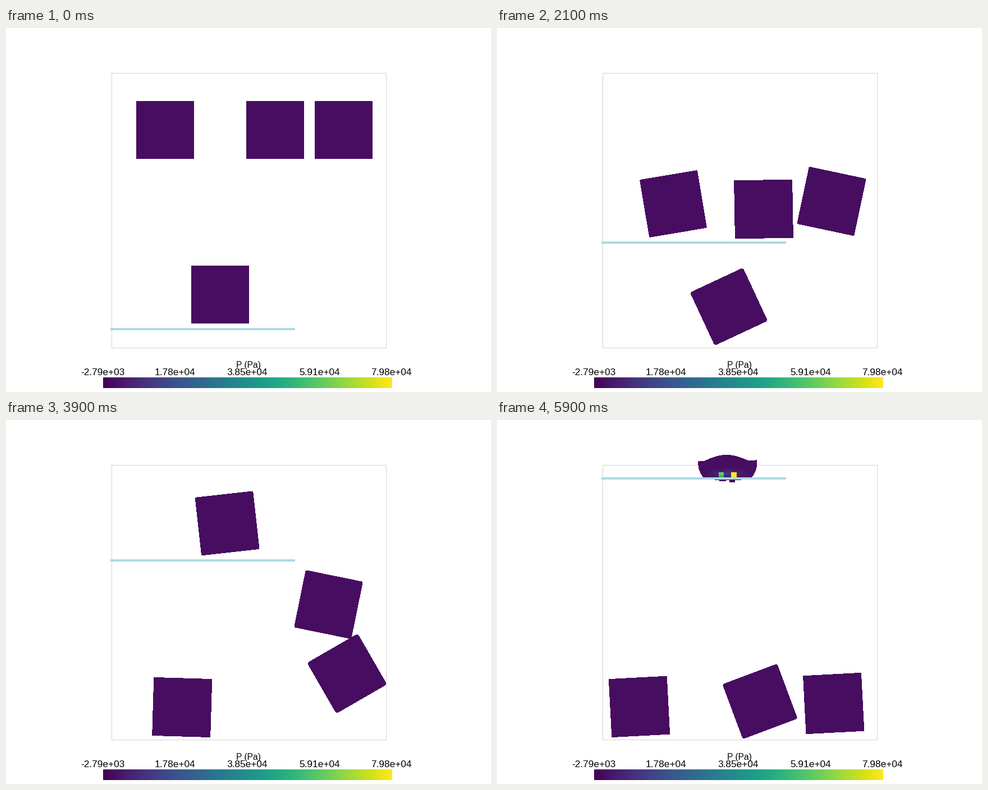
Recreate the animation shown at these times as a matplotlib script. Size 864 by 648 pixels, loop 6 s.

```python
import numpy as np
import matplotlib.pyplot as plt
from matplotlib.animation import FuncAnimation
from matplotlib.patches import Polygon, Rectangle

W, H, DPI = 864, 648, 100
FRAMES, INTERVAL = 60, 100
PX = 72 / DPI
SIDE = 103
GRAVITY = 0.8
FLOOR = 564.5
HIT = 6.3            # first contact of the falling blocks
CRUSH = 48           # the upper block reaches the ceiling
LAST = FRAMES - 1
VIRIDIS = plt.get_cmap("viridis")
DARK = VIRIDIS(0.034)


def plate_y(t):
    return 536.3 - 7.33 * t


def fall(t):
    return 181 + 20.2 * t + GRAVITY / 2 * t ** 2


def along(t, keys):
    """Straight motion between key rows of (time, value, ...)."""
    times, *channels = zip(*keys)
    return [np.interp(t, times, c) for c in channels]


def tumble(t, keys):
    """Free flight between contacts given as (time, x, y, degrees)."""
    x, y, angle = along(t, keys)
    for (t0, *_), (t1, *_) in zip(keys, keys[1:]):
        if t0 <= t < t1:
            y -= GRAVITY / 2 * (t - t0) * (t1 - t)
    return x, y, angle


def left(t):
    """Spins off the wall, then slides and rocks on the rising plate."""
    rock = 7 * np.cos(2 * np.pi * (t - 21) / 18) * np.exp((21 - t) / 30)
    angle = max(-14.8 * max(t - HIT, 0), -92.5 - rock)
    y = min(fall(t), fall(HIT) + 9.3 * (t - HIT),
            plate_y(t) - 63.1 - 0.9 * rock)
    if t < 10:
        x = 283.5 - 9.3 * np.clip(t - HIT, 0, 3)
    else:
        x = 411 - 156 * max((45 - t) / 35, 0) ** 1.26
    return x, y, angle


def middle(t):
    """Bounces off the lower block and drops past the end of the plate."""
    if t < HIT:
        return 479.5, fall(t), 0
    return tumble(t, [(HIT, 479.5, fall(HIT), 0), (9, 500, 348, 34.7),
                      (14, 540, 284, 75), (21, 596, 308.5, 102),
                      (29, 619, 345, 87.5), (39, 607.5, 451.5, 60),
                      (48, 576, 491.5, 42), (59, 599.7, 504.5, -3)])


def right(t):
    """Drops to the floor, rolls to the left wall and comes back."""
    x, angle = along(t, [(HIT, 601.5, 0), (9, 608.5, 8.5), (13.5, 605, 0),
                         (21, 413, -25), (27, 260, -92), (48, 354, -85.5),
                         (59, 253.5, -93)])
    a = np.radians(angle)
    reach = SIDE / 2 * (abs(np.cos(a)) + abs(np.sin(a)))
    return x, min(fall(t), FLOOR - reach), angle


def lower(t):
    """Rides the plate, then tips over its end."""
    if t < 21:
        x = 381.5 + 7.8 * max(t - 9, 0)
        return x, plate_y(t) - 62 + 0.1 * t, 0
    return tumble(t, [(21, 475, 322.5, -1), (29, 526.5, 257.5, 48),
                      (39, 574.5, 328.5, 101.5), (48, 466, 419, 135),
                      (59, 468.5, 501, 159.5)])


def block(x, y, angle):
    """Square whose corners are blunted the more it is tilted."""
    a = np.radians(angle)
    h = SIDE / 2
    k = h - 3 * abs(np.sin(2 * a))
    pts = np.array([(-k, -h), (k, -h), (h, -k), (h, k),
                    (k, h), (-k, h), (-h, k), (-h, -k)])
    c, s = np.cos(a), np.sin(a)
    return pts @ np.array([(c, s), (-s, c)]) + (x, y)


def crushed(t):
    """Block squeezed against the ceiling by the rising plate."""
    c = (t - CRUSH) / (LAST - CRUSH)
    half = 52
    corner, bottom = 81 - 8 * c, plate_y(t) - 4.5 + 2 * c
    u = np.linspace(-half, half, 40)
    dome = 10.5 * c * np.clip(np.cos(np.pi * (u + 3) / 78), 0, 1) + 0.02 * c * u
    v = np.linspace(0, 1, 12)
    edge = half - 9 * c * v ** 2.5
    side = corner + (bottom - corner) * v
    xs = np.concatenate([u, edge, -edge[::-1]])
    ys = np.concatenate([corner - dome, side, side[::-1]])
    return np.column_stack([410.7 + xs, ys])


fig = plt.figure(figsize=(W / DPI, H / DPI), dpi=DPI, facecolor="white")
ax = fig.add_axes([0, 0, 1, 1])
ax.axis("off")


def rect(x, y, w, h, color, z):
    return ax.add_patch(Rectangle((x, y), w, h, fc=color, ec="none",
                                  lw=0, zorder=z, aa=False))


ax.add_patch(Rectangle((187.5, 79.5), 489, 489, fill=False, ec="#d3d3d3",
                       lw=PX, zorder=1))

blocks = []
for path in (left, middle, right, lower):
    patch = Polygon(block(*path(0)), closed=True, fc=DARK, ec="none",
                    lw=0, aa=False, zorder=2)
    ax.add_patch(patch)
    blocks.append((patch, path))

# Pressure glow and hot cells inside the crushed block
gx, gy = np.meshgrid(np.linspace(-1, 1, 80), np.linspace(-1, 1, 24))
glow_rgba = np.empty(gx.shape + (4,))
glow_rgba[..., :3] = VIRIDIS(0.18)[:3]
glow_rgba[..., 3] = np.exp(-3 * gx ** 2 - 3 * (gy - 0.4) ** 2)
glow = ax.imshow(glow_rgba, extent=(366, 456, 24, 0), aspect="auto", zorder=3)
cells = [(rect(394.5, 0, 9.5, 5.5, DARK, 4), -11, 0.77),
         (rect(394.5, 0, 9.5, 4, DARK, 4), -5.5, 0.66),
         (rect(417, 0, 10, 8.5, DARK, 4), -10.5, 1.0)]
debris = [rect(388, 105, 47, 2, DARK, 2), rect(396, 107, 12, 2, DARK, 2),
          rect(414, 107, 10, 4, DARK, 2)]

plate = rect(185.5, 534, 329.5, 4, "#add8e6", 5)

# Colour bar
ax.imshow(np.linspace(0, 1, 256)[None, :], cmap=VIRIDIS, aspect="auto",
          extent=(173, 687.5, 640.8, 622.3), zorder=1)


def label(x, y, text, size):
    ax.text(x, y, text, family="Liberation Sans", fontsize=size * PX,
            ha="center", va="baseline", color="black", zorder=6)


label(432, 605, "P (Pa)", 15.5)
ticks = ("-2.79e+03", "1.78e+04", "3.85e+04", "5.91e+04", "7.98e+04")
for i, text in enumerate(ticks):
    label(172.7 + 128.5 * i, 617.7, text, 17.2)


def update(t):
    y = plate_y(t)
    plate.set_y(round(y) - 2)
    for patch, path in blocks:
        squeezed = path is left and t >= CRUSH
        patch.set_xy(crushed(t) if squeezed else block(*path(t)))

    load = np.clip((t - 53) / (LAST - 53), 0, 1)
    glow.set_alpha(0.85 * load)
    glow.set_visible(load > 0)
    glow.set_extent((366, 456, y - 2, y - 24))
    for cell, dy, level in cells:
        cell.set_y(y + dy)
        cell.set_facecolor(VIRIDIS(0.034 + (level - 0.034) * load ** 3))
        cell.set_visible(load > 0.4)
    for bit in debris:
        bit.set_visible(t >= 58)
    ax.set_xlim(0, W)
    ax.set_ylim(H, 0)
    return []


anim = FuncAnimation(fig, update, frames=FRAMES, interval=INTERVAL,
                     repeat=True, repeat_delay=0, blit=False)
plt.show()
```
